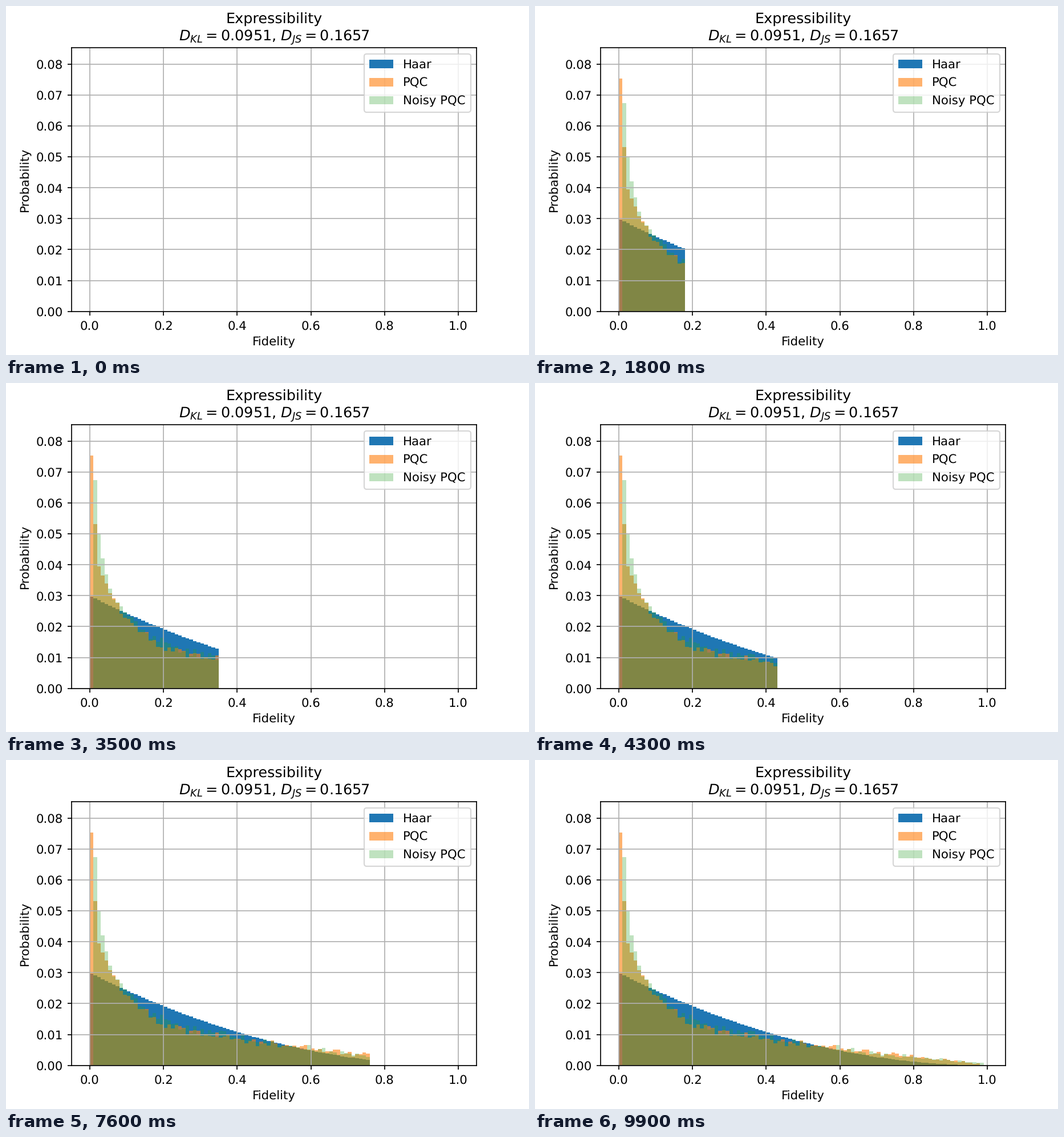
These frames come from a looping animation (917x611 px, 10 s). A matplotlib script:

```python
import numpy as np
import matplotlib.pyplot as plt
from matplotlib.animation import FuncAnimation

DPI = 152.75
BINS = 99
FRAMES = 100
INTERVAL = 100

plt.rcParams["text.hinting"] = "no_hinting"
rng = np.random.default_rng(7)
edges = np.arange(BINS + 1) / 100
bins = np.arange(BINS)


def sampled(points, heights):
    """Histogram along a few key points, with sampling noise past the peak."""
    trend = np.interp(bins, points, heights)
    spread = 0.008 * np.sqrt(trend) * np.minimum(bins / 15, 1)
    return np.maximum(trend + spread * rng.normal(size=BINS), 0)


# Haar-random fidelities of two qubits: P(F > x) = (1 - x)^3
haar = -np.diff((1 - edges) ** 3)
pqc = sampled(
    [0, 1, 2, 5, 8, 12, 20, 30, 45, 60, 75, 98],
    [0.0753, 0.0531, 0.0396, 0.0313, 0.0245, 0.0198,
     0.0138, 0.0108, 0.0073, 0.0054, 0.0034, 0.0004])
noisy = sampled(
    [0, 1, 2, 3, 4, 6, 9, 15, 20, 30, 50, 70, 98],
    [0, 0.0675, 0.05, 0.042, 0.036, 0.0292, 0.0248,
     0.0178, 0.0148, 0.0112, 0.007, 0.0038, 0.0006])

fig, ax = plt.subplots(figsize=(917 / DPI + 1e-9, 611 / DPI), dpi=DPI)
fig.subplots_adjust(left=0.125, right=0.9, bottom=0.125, top=0.88)

series = [
    (haar, "C0", 1.0, "Haar"),
    (pqc, "C1", 0.6, "PQC"),
    (noisy, "C2", 0.3, "Noisy PQC"),
]
groups = [
    ax.bar(edges[:-1], heights, width=0.01, align="edge",
           color=color, alpha=alpha, label=label)
    for heights, color, alpha, label in series
]

ax.set_xlim(-0.05, 1.05)
ax.set_ylim(0, 0.0853)
ax.set_xlabel("Fidelity")
ax.set_ylabel("Probability")
ax.set_title("Expressibility\n$D_{KL} = 0.0951$, $D_{JS} = 0.1657$",
             linespacing=1.23)
ax.tick_params(axis="x", pad=3.9)
ax.grid(True)
ax.legend(loc="upper right", labelspacing=0.54, borderpad=0.42)


def update(frame):
    """Reveal one more bin of every histogram per frame."""
    bars = [bar for group in groups for bar in group]
    for i, bar in enumerate(bars):
        bar.set_visible(i % BINS < frame)
    return bars


anim = FuncAnimation(fig, update, frames=FRAMES, interval=INTERVAL,
                     repeat=True, repeat_delay=0, blit=False)
plt.show()
```
